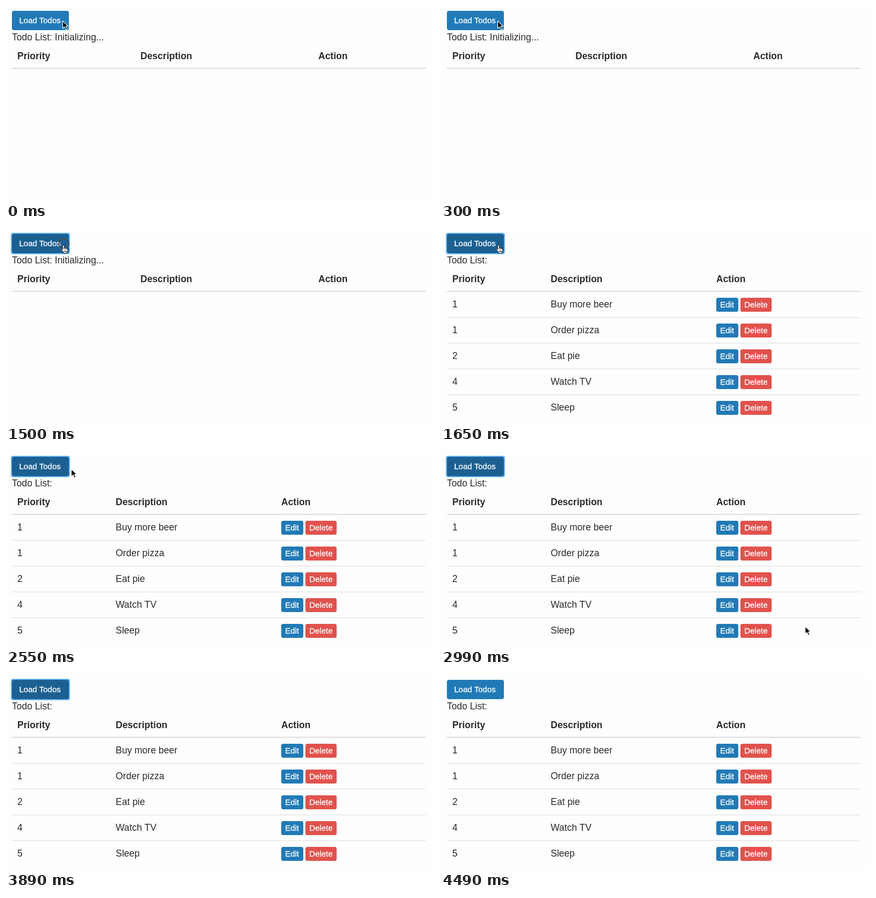
Animation of 798x363 px, one loop 4.53 s. Source, as an HTML page:

```html
<!DOCTYPE html>
<html lang="en">
<head>
<meta charset="utf-8">
<title>Todo list</title>
<style>
  html, body { margin: 0; width: 100%; height: 100%; overflow: hidden; background: #fefefe; }
  svg { display: block; }
  text { font: 17.5px "Liberation Sans", Arial, sans-serif; fill: #292b2c; }
  .head { font-weight: 700; }
  .label { font-size: 15px; fill: #fff; stroke: #fff; stroke-width: .3px; }
  .small { font-size: 15px; }
  .rule { fill: #dcdcdc; }
</style>
</head>
<body>
<svg id="stage" width="798" height="363" viewBox="0 0 798 363">
  <defs>
    <filter id="soft" x="-10%" y="-30%" width="120%" height="160%">
      <feGaussianBlur stdDeviation=".7"/>
    </filter>
  </defs>
  <rect id="ring" x="9" y="7" width="110" height="40" rx="4" fill="#6db8fb" filter="url(#soft)"/>
  <rect id="load" x="11" y="9" width="106" height="36" rx="4"/>
  <text class="label" x="24.5" y="32">Load Todos</text>
  <text id="status" x="11" y="64"></text>
  <g id="empty"></g>
  <g id="list"></g>
  <rect class="rule" x="11" y="115" width="770" height="2"/>
  <g id="click" fill="none">
    <circle cx="107.5" cy="27.5" r="9.3" stroke="#fff" stroke-opacity=".45" stroke-width="2.4"/>
    <circle cx="107.5" cy="27.5" r="9.3" stroke="#111" stroke-width="1.3"/>
  </g>
  <path id="arrow" d="M.5 .8V14.6L3.7 11.6L6.2 17.2L8.6 16.1L6.2 10.7H10.5Z"
    fill="#000" stroke="#fff" stroke-width="1.1" stroke-linejoin="round"/>
  <path id="hand" d="M3.6 9.2V2.2Q3.6 .7 5 .7T6.4 2.2V6.2Q7 5.1 8.5 5.7L8.8 6.6Q10 5.8 11 6.7L11.2 7.6Q13 7.1 13 9V11.6L11.7 14V16H5.3V14.5L1.2 9.7Q.3 8.3 1.5 7.7Q2.6 7.4 3.6 9.2ZM6.4 6.2V9M8.8 6.6V9M11 7.4V9.2M6.9 11V13.8M8.7 11V13.8M10.4 11V13.8"
    fill="#fff" stroke="#111" stroke-width=".95" stroke-linejoin="round"/>
</svg>
<script>
const LOOP = 4530;
const START = performance.now();
const $ = id => document.getElementById(id);

function add(parent, tag, attrs, content) {
  const el = document.createElementNS("http://www.w3.org/2000/svg", tag);
  for (const key in attrs) el.setAttribute(key, attrs[key]);
  if (content !== undefined) el.textContent = content;
  parent.append(el);
}

function addHeads(parent, columns) {
  ["Priority", "Description", "Action"].forEach((name, i) =>
    add(parent, "text", { class: "head", x: columns[i], y: 99 }, name));
}

function addButton(parent, x, y, width, fill, name) {
  add(parent, "rect", { x, y, width, height: 26, rx: 3.5, fill });
  add(parent, "text", { class: "label small", x: x + 7.2, y: y + 18.3 }, name);
}

const todos = [
  [1, "Buy more beer"], [1, "Order pizza"], [2, "Eat pie"],
  [4, "Watch TV"], [5, "Sleep"]
];

addHeads($("empty"), [21, 250, 581]);
addHeads($("list"), [21, 204, 512]);
todos.forEach(([priority, name], i) => {
  const y = 128 + 48 * i;
  if (i) add($("list"), "rect", { class: "rule", x: 11, y: y - 12, width: 770, height: 1 });
  add($("list"), "text", { x: 21, y: y + 18 }, priority);
  add($("list"), "text", { x: 204, y: y + 18 }, name);
  addButton($("list"), 512, y, 41, "#217ab6", "Edit");
  addButton($("list"), 557, y, 58, "#e1524d", "Delete");
});

// time, pointer, x, y
const pointer = [
  [0, "arrow", 105, 27],
  [1500, "hand", 102, 29],
  [2550, "arrow", 121, 31],
  [2700, "arrow", 486, 214],
  [2840, "arrow", 624, 303],
  [2990, "arrow", 677, 324],
  [3140, "arrow", 735, 355],
  [3290, "none", 0, 0]
];

const within = (t, from, to) => t >= from && t < to;
const show = (id, on) => $(id).setAttribute("visibility", on ? "visible" : "hidden");

function draw(t) {
  const loaded = t >= 1650;
  const focused = within(t, 1500, 4490);
  show("empty", !loaded);
  show("list", loaded);
  $("status").textContent = loaded ? "Todo List:" : "Todo List: Initializing...";
  show("ring", focused);
  $("load").setAttribute("fill", focused ? "#1c6091" : "#217ab6");
  show("click", within(t, 150, 300) || within(t, 1500, 1650));

  const [, kind, x, y] = pointer.filter(step => step[0] <= t).pop();
  for (const id of ["arrow", "hand"]) {
    show(id, id === kind);
    $(id).setAttribute("transform", `translate(${x} ${y})`);
  }
}

function tick() {
  draw((performance.now() - START) % LOOP);
  requestAnimationFrame(tick);
}
tick();
</script>
</body>
</html>
```
